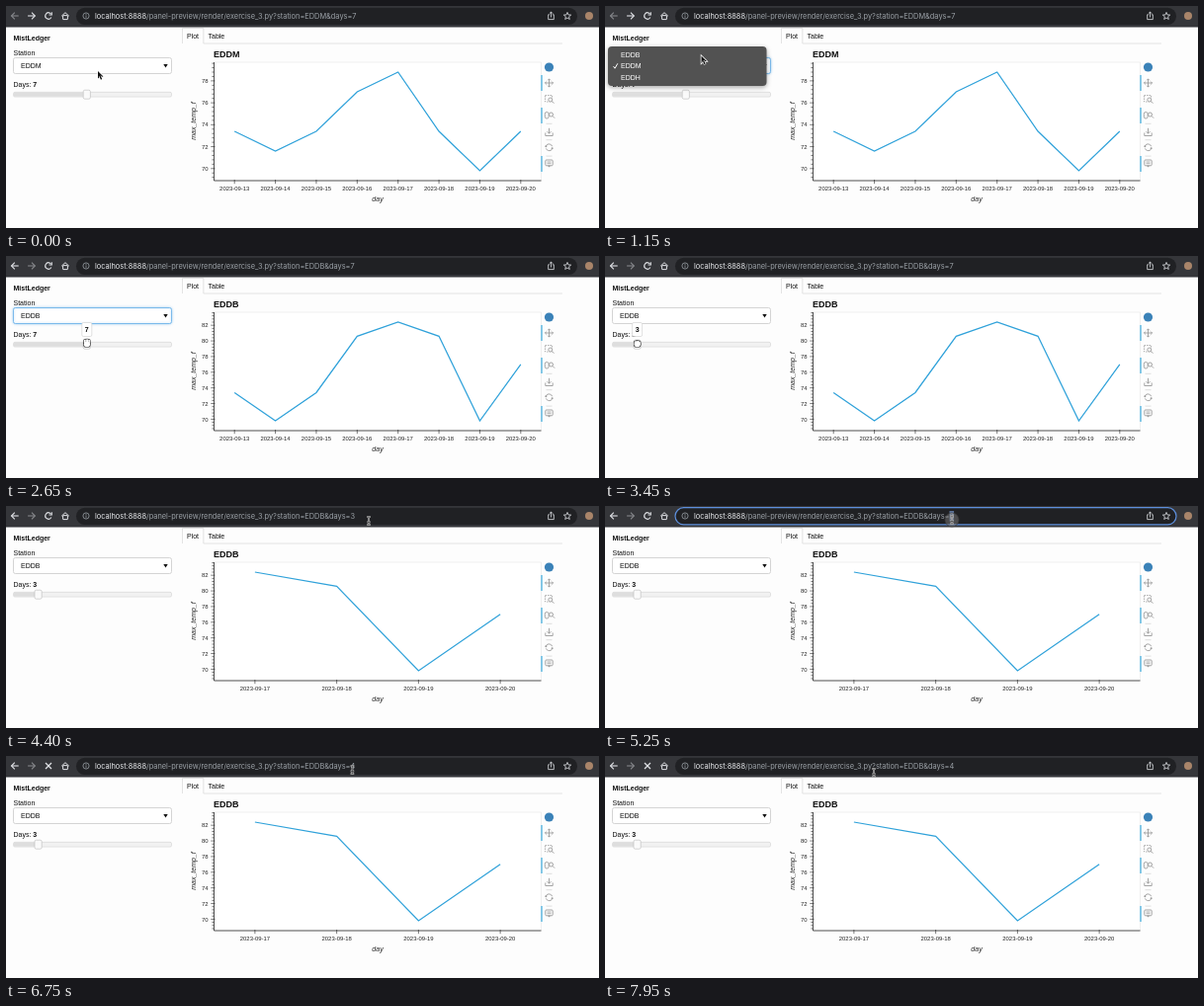
An HTML page with a canvas that plays this animation: 600 by 225 pixels, repeating every 8 s.

```html
<!DOCTYPE html>
<html lang="en">
<head>
<meta charset="utf-8">
<title>Weather dashboard</title>
<style>
html, body { margin: 0; width: 100%; height: 100%; overflow: hidden; background: #fdfdfd; }
canvas { display: block; width: 600px; height: 225px; }
</style>
</head>
<body>
<canvas id="stage"></canvas>
<script>
const W = 600, H = 225, LOOP = 8000, TAU = Math.PI * 2;
const UP = -Math.PI / 2, DOWN = Math.PI / 2, LEFT = Math.PI, RIGHT = 0;
const canvas = document.getElementById("stage");
const ratio = window.devicePixelRatio || 1;
canvas.width = W * ratio;
canvas.height = H * ratio;
const c = canvas.getContext("2d");

const PAGE = '"Liberation Sans", Arial, sans-serif';
const BAR = 'Inter, sans-serif';
const BRIGHT = "#dfe1e5", DIM = "#85878b", GREY = "#9aa0a6";

// Daily maxima in °C; the plot shows °F
const FIRST_DAY = 13;
const CELSIUS = {
  EDDM: [23, 22, 23, 25, 26, 23, 21, 23],
  EDDB: [23, 21, 23, 27, 28, 27, 21, 25]
};

// Moments in ms
const T = {
  open: 500, overFirst: 850, blinkOff: 1100, blinkOn: 1200, picked: 1300,
  chart: 1800, hover: 2300, grab: 2700, release: 3550, fewer: 3700,
  focus: 4800, select: 5150, clickEnd: 5400, typed: 5600, enter: 5850, closed: 6000
};

const handleX = days => 8 + (days - 1) * 12.3;

// Pointer moves: where each one ends and when it runs
const MOVES = [
  { x: 93, y: 66, from: -1, to: 0 },
  { x: 97.5, y: 50.5, from: 550, to: 1000 },
  { x: handleX(7), y: 88, from: 1350, to: T.hover },
  { x: handleX(3), y: 88, from: T.grab, to: 3350 },
  { x: 367, y: 15, from: T.fewer, to: 4350 },
  { x: 351, y: 14, from: 4750, to: 5100 },
  { x: 272, y: 17, from: 6700, to: 7700 }
];

const clamp = (v, lo, hi) => Math.max(lo, Math.min(hi, v));
const between = (t, a, b) => t >= a && t < b;

function pointerAt(t) {
  let { x, y } = MOVES[0];
  for (const m of MOVES) {
    const u = clamp((t - m.from) / (m.to - m.from), 0, 1), e = u * u * (3 - 2 * u);
    x += (m.x - x) * e;
    y += (m.y - y) * e;
  }
  return { x, y };
}

// ---- drawing helpers ----

function text(s, x, y, size, { color = "#111", style = "", align = "left", font = PAGE } = {}) {
  c.font = `${style} ${size}px ${font}`;
  c.fillStyle = color;
  c.textAlign = align;
  c.fillText(s, x, y);
  return c.measureText(s).width;
}

function paint(fill, stroke, width) {
  if (stroke) { c.strokeStyle = stroke; c.lineWidth = width; c.stroke(); }
  if (fill) { c.fillStyle = fill; c.fill(); }
}

function line(color, width, ...xy) {
  c.beginPath();
  for (let i = 0; i < xy.length; i += 2) c.lineTo(xy[i], xy[i + 1]);
  paint(null, color, width);
}

function box(x, y, w, h, r, fill, stroke, width = 0.7) {
  c.beginPath();
  c.roundRect(x, y, w, h, r);
  paint(fill, null);
  paint(null, stroke, width);
}

function ring(x, y, r, color, width, from = 0, to = TAU) {
  c.beginPath();
  c.arc(x, y, r, from, to);
  paint(null, color, width);
}

function dot(x, y, r, color) {
  c.beginPath();
  c.arc(x, y, r, 0, TAU);
  paint(color);
}

// Arrow with its tip at x, y; angle is the way it points
function arrowIcon(x, y, angle, length, head, color, width) {
  c.save();
  c.translate(x, y);
  c.rotate(angle);
  line(color, width, -length, 0, 0, 0);
  line(color, width, -head, -head, 0, 0, -head, head);
  c.restore();
}

function triangle(x, y, angle, w, h, color) {
  c.save();
  c.translate(x, y);
  c.rotate(angle);
  c.beginPath();
  c.moveTo(h, 0);
  c.lineTo(0, -w / 2);
  c.lineTo(0, w / 2);
  paint(color);
  c.restore();
}

function lens(x, y, r, color) {
  ring(x, y, r, color, 0.9);
  line(color, 0.9, x + r * 0.7, y + r * 0.7, x + r * 1.8, y + r * 1.8);
}

function withShadow(blur, color, dy, draw) {
  c.save();
  c.shadowBlur = blur * ratio;
  c.shadowColor = color;
  c.shadowOffsetY = dy * ratio;
  draw();
  c.restore();
}

// ---- browser bar ----

const HOST = "localhost:8888";
const urlTail = s => `/panel-preview/render/exercise_3.py?station=${s.plotStation}&days=${s.urlDays}`;

function navIcons(s) {
  arrowIcon(5.5, 10, LEFT, 7.2, 3.3, s.wentOn ? BRIGHT : DIM, 1.1);
  arrowIcon(29.3, 10, RIGHT, 7.2, 3.3, s.wentOn ? DIM : BRIGHT, 1.1);
  if (s.loading) {
    for (const d of [-3, 3]) line(BRIGHT, 1.2, 43 - d, 7, 43 + d, 13);
  } else {
    ring(43, 10, 3.2, BRIGHT, 1.1, 0.5, 5.6);
    triangle(44.3, 7.7, -Math.PI / 4 + Math.PI, 0, 0, BRIGHT);
    triangle(44.4, 9.2, -Math.PI / 4, 0, 0, BRIGHT);
    line(BRIGHT, 1.1, 46.3, 6.3, 46.3, 9, 43.6, 9);
  }
  line(BRIGHT, 1, 56.2, 10.2, 60, 6.7, 63.8, 10.2);
  box(57.6, 9.6, 4.8, 4, 0.3, null, BRIGHT, 1);
  dot(590, 10, 4, "#a9856a");
}

function pageIcons() {
  ring(81, 10, 3.1, GREY, 0.8);
  line(GREY, 0.8, 81, 9.4, 81, 11.8);
  dot(81, 8.3, 0.5, GREY);
  line(BRIGHT, 0.8, 550, 8.8, 548.7, 8.8, 548.7, 13.6, 554.3, 13.6, 554.3, 8.8, 553, 8.8);
  arrowIcon(551.5, 6, UP, 5.5, 1.7, BRIGHT, 0.8);
  c.beginPath();
  for (let i = 0; i < 10; i++) {
    const a = UP + i * TAU / 10, r = i % 2 ? 1.7 : 3.9;
    c.lineTo(568 + r * Math.cos(a), 10.3 + r * Math.sin(a));
  }
  c.closePath();
  paint(null, BRIGHT, 0.8);
}

function urlText(s) {
  const size = 7.4, y = 12.8, font = BAR;
  const x = 90 + text(HOST, 90, y, size, { color: s.suggest ? "#b4b7bb" : "#e8eaed", font });
  const width = text(urlTail(s), x, y, size, { color: GREY, font });
  if (!s.marked) return;
  const w = c.measureText(s.urlDays).width, at = x + width - w;
  box(at, 5, w, 10.5, 0, "#5b7299");
  text(s.urlDays, at, y, size, { color: "#fff", font });
}

function suggestions(s) {
  const url = HOST + urlTail(s), font = BAR;
  withShadow(5, "rgba(0,0,0,.4)", 1, () => box(69, 0, 512, 69, [0, 0, 8, 8], "#222327"));
  box(69, 24, 512, 17.5, 0, "#393b41");
  dot(81, 32.7, 3.5, "#d5d7da");
  line("#393b41", 0.7, 77.5, 32.7, 84.5, 32.7);
  ring(81, 32.7, 1.6, "#393b41", 0.6);
  text(url, 95.5, 35.3, 7.6, { color: "#5c94f5", style: "600", font });
  lens(80.5, 53.2, 2.2, BRIGHT);
  const x = 95.5 + text(url, 95.5, 56.5, 7.28, { color: "#e8eaed", style: "500", font });
  text("– Quarvo Search", x + 2.5, 56.5, 7.2, { color: GREY, font });
}

function browserBar(s) {
  box(0, 0, W, 21.5, 0, "#35363a");
  navIcons(s);
  if (s.suggest) suggestions(s);
  else box(71, 1.7, 507, 17.2, 8.6, "#202124", s.focus && "#5d8fdc", 1.2);
  pageIcons();
  urlText(s);
}

// ---- side panel ----

function selectBox(s) {
  const draw = () => box(7.5, 52.5, 160, 16, 2, "#fff", s.selectFocus ? "#66afe9" : "#c9c9c9", 0.8);
  s.selectFocus ? withShadow(2.5, "rgba(102,175,233,.6)", 0, draw) : draw();
  text(s.station, 15, 63.2, 7);
  triangle(161.5, 58.9, DOWN, 4.4, 3.7, "#111");
}

function slider(s) {
  const x = handleX(s.days);
  box(7.5, 87.3, 160, 4.8, 1.5, "#f1f1f1", "#d0d0d0", 0.6);
  box(7.8, 87.6, x - 7.8, 4.2, 1.2, "#dedede");
  box(x - 3.6, 85.2, 7.2, 9, 1.6, "#fafafa", "#c2c2c2");
  if (!s.tooltip) return;
  box(x - 5, 67.5, 10, 14, 1.5, "#fff", "#d4d4d4");
  text(s.days, x, 77, 7, { style: "bold", align: "center" });
}

function sidePanel(s) {
  text("MistLedger", 7.5, 34.5, 7, { style: "bold" });
  text("Station", 7.5, 50, 7);
  selectBox(s);
  const w = text("Days: ", 7.5, 81.7, 7);
  text(s.days, 7.5 + w, 81.7, 7, { style: "bold" });
  slider(s);
}

function menu(s) {
  withShadow(5, "rgba(0,0,0,.35)", 1.5, () => box(3, 41, 160.5, 40, 4, "#525252"));
  ["EDDB", "EDDM", "EDDH"].forEach((name, i) => {
    const y = 49.3 + i * 11.6;
    if (i === s.hot) box(5.5, y - 5.7, 155.5, 11.4, 2.5, "#3478e0");
    text(name, 16, y + 2.5, 7, { color: "#fff" });
  });
  line("#fff", 1, 8.5, 61.2, 10, 63.2, 12.8, 58.3);
}

// ---- plot ----

function tabs() {
  line("#dcdcdc", 0.8, 178.5, 38, 178.5, 22.5, 199.8, 22.5, 199.8, 38, 563, 38);
  text("Plot", 183, 32.8, 7);
  text("Table", 204.5, 32.8, 7);
}

function plot(s) {
  const x = 210.5, y = 57, w = 331, h = 120, bottom = y + h, ink = "#222";
  const all = CELSIUS[s.plotStation].map(v => v * 1.8 + 32);
  const temps = all.slice(-s.plotDays - 1);
  const lo = Math.min(...temps), hi = Math.max(...temps), pad = (hi - lo) / 10;
  const px = i => x + w / temps.length * (i + 0.5);
  const py = v => y + (hi + pad - v) / (hi - lo + 2 * pad) * h;

  box(x, y, w, h, 0, "#fff", "#e5e5e5", 0.6);
  text(s.plotStation, 210, 52, 9, { style: "bold" });
  line("#111", 0.7, x, y, x, bottom, x + w, bottom);

  // five minor ticks to each labelled step of two degrees
  for (let k = Math.ceil((lo - pad) / 0.4); k * 0.4 <= hi + pad; k++) {
    const at = py(k * 0.4), major = k % 5 === 0;
    line(ink, 0.6, x - (major ? 3.2 : 2.1), at, x + (major ? 1 : 0), at);
    if (major) text((k * 0.4).toFixed(0), x - 6, at + 2.1, 5.9, { align: "right", color: ink });
  }
  temps.forEach((_, i) => {
    line(ink, 0.6, px(i), bottom - 1, px(i), bottom + 3.2);
    const day = FIRST_DAY + all.length - temps.length + i;
    text(`2023-09-${day}`, px(i), 187, 5.9, { align: "center", color: ink });
  });
  const label = { style: "italic", align: "center", color: ink };
  text("day", x + w / 2, 197.7, 7, label);
  c.save();
  c.translate(192, 116.5);
  c.rotate(UP);
  text("max_temp_f", 0, 0, 7, label);
  c.restore();

  line("#30a2da", 1.25, ...temps.flatMap((v, i) => [px(i), py(v)]));
}

function plotTools() {
  const x = 549.5, g = "#9b9b9b";
  for (const y of [78, 111, 160]) line("#3aa9dc", 1.2, 542, y - 8, 542, y + 8);
  for (let i = 0; i < 3; i++) line("#d2d2d2", 0.7, x - 3, 119.3 + i * 16.4, x + 3, 119.3 + i * 16.4);
  dot(x, 62, 4.6, "#3b82b8");
  // pan
  for (const a of [UP, DOWN, LEFT, RIGHT])
    arrowIcon(x + 4.1 * Math.cos(a), 78 + 4.1 * Math.sin(a), a, 4.1, 1.4, g, 0.9);
  // box zoom
  c.setLineDash([1.5, 1]);
  box(x - 4, 90.5, 7, 6.5, 0, null, g, 0.8);
  c.setLineDash([]);
  dot(x + 1.3, 95, 2.6, "#fdfdfd");
  lens(x + 1.3, 95, 2, g);
  // wheel zoom
  box(x - 4.2, 107.5, 3.8, 6.5, 1.8, null, g, 0.9);
  lens(x + 2, 110, 2, g);
  // save
  line(g, 0.9, x - 3.7, 128.5, x - 3.7, 131.5, x + 3.7, 131.5, x + 3.7, 128.5);
  arrowIcon(x, 129.2, DOWN, 5.4, 2, g, 0.9);
  // reset
  for (const a of [0.3, 0.3 + Math.PI]) {
    ring(x, 143.3, 3.3, g, 0.9, a, a + 2.5);
    dot(x + 3.3 * Math.cos(a), 143.3 + 3.3 * Math.sin(a), 1, g);
  }
  // hover
  box(x - 3.7, 156, 7.4, 5.8, 1, null, g, 0.9);
  for (const y of [158, 159.7]) line(g, 0.8, x - 2, y, x + 2, y);
  triangle(x, 161.8, DOWN, 3, 1.8, g);
}

// ---- pointer ----

function arrow() {
  c.beginPath();
  c.lineTo(0, 0);
  c.lineTo(0, 7.6);
  c.lineTo(1.9, 5.9);
  c.lineTo(5.5, 5.5);
  c.closePath();
  paint("#111", "#fff", 1.5);
  line("#fff", 2.6, 2, 5, 3.8, 8.8);
  line("#111", 1.4, 2, 5, 3.6, 8.4);
}

function ibeam() {
  for (const [color, width] of [["rgba(255,255,255,.85)", 1.7], ["#222", 0.7]]) {
    line(color, width, 0, -4, 0, 4);
    for (const y of [-4, 1.4, 4]) line(color, width, -1.8, y, 1.8, y);
  }
}

function hand(closed) {
  const top = closed ? -2.4 : -4;
  const parts = (fill, stroke) => {
    for (let i = 0; i < 4; i++) box(-2.9 + i * 1.5, top + Math.abs(i - 1.5) * 0.5, 1.5, 4, 0.7, fill, stroke, 1.1);
    box(-3, -1, 6.2, 5, 2, fill, stroke, 1.1);
  };
  parts(null, "#222");
  parts("#fff", null);
}

function pointer(t, s) {
  const { x, y } = pointerAt(t);
  c.save();
  c.translate(x, y);
  if (s.click) {
    dot(0, 0, 7, "rgba(120,120,120,.5)");
    ring(0, 0, 7, "rgba(60,60,60,.65)", 1);
  }
  if (s.tooltip) hand(s.grab);
  else if (y < 20 && !s.typing) ibeam();
  else arrow();
  c.restore();
}

// ---- timeline ----

function stateAt(t) {
  const dragX = pointerAt(Math.min(t, T.release)).x;
  return {
    days: t < T.grab ? 7 : clamp(Math.round(1 + (dragX - 8) / 12.3), 3, 7),
    station: t < T.picked ? "EDDM" : "EDDB",
    plotStation: t < T.chart ? "EDDM" : "EDDB",
    wentOn: t >= T.chart,
    plotDays: t < T.fewer ? 7 : 3,
    urlDays: t < T.release ? 7 : t < T.typed ? 3 : 4,
    menu: between(t, T.open, T.picked),
    hot: between(t, T.blinkOff, T.blinkOn) ? -1 : t < T.overFirst ? 1 : 0,
    selectFocus: between(t, T.open, T.grab),
    tooltip: between(t, T.hover, T.release),
    grab: between(t, T.grab, T.release),
    focus: between(t, T.focus, T.closed),
    marked: between(t, T.select, T.typed),
    click: between(t, T.select, T.clickEnd),
    typing: between(t, T.clickEnd, 6750),
    suggest: between(t, T.typed, T.closed),
    loading: t >= T.enter
  };
}

function draw(t) {
  const s = stateAt(t);
  c.setTransform(ratio, 0, 0, ratio, 0, 0);
  box(0, 0, W, H, 0, "#fdfdfd");
  sidePanel(s);
  tabs();
  plot(s);
  plotTools();
  browserBar(s);
  if (s.menu) menu(s);
  pointer(t, s);
}

const begin = performance.now();
function tick() {
  draw((performance.now() - begin) % LOOP);
  requestAnimationFrame(tick);
}
tick();
</script>
</body>
</html>
```
